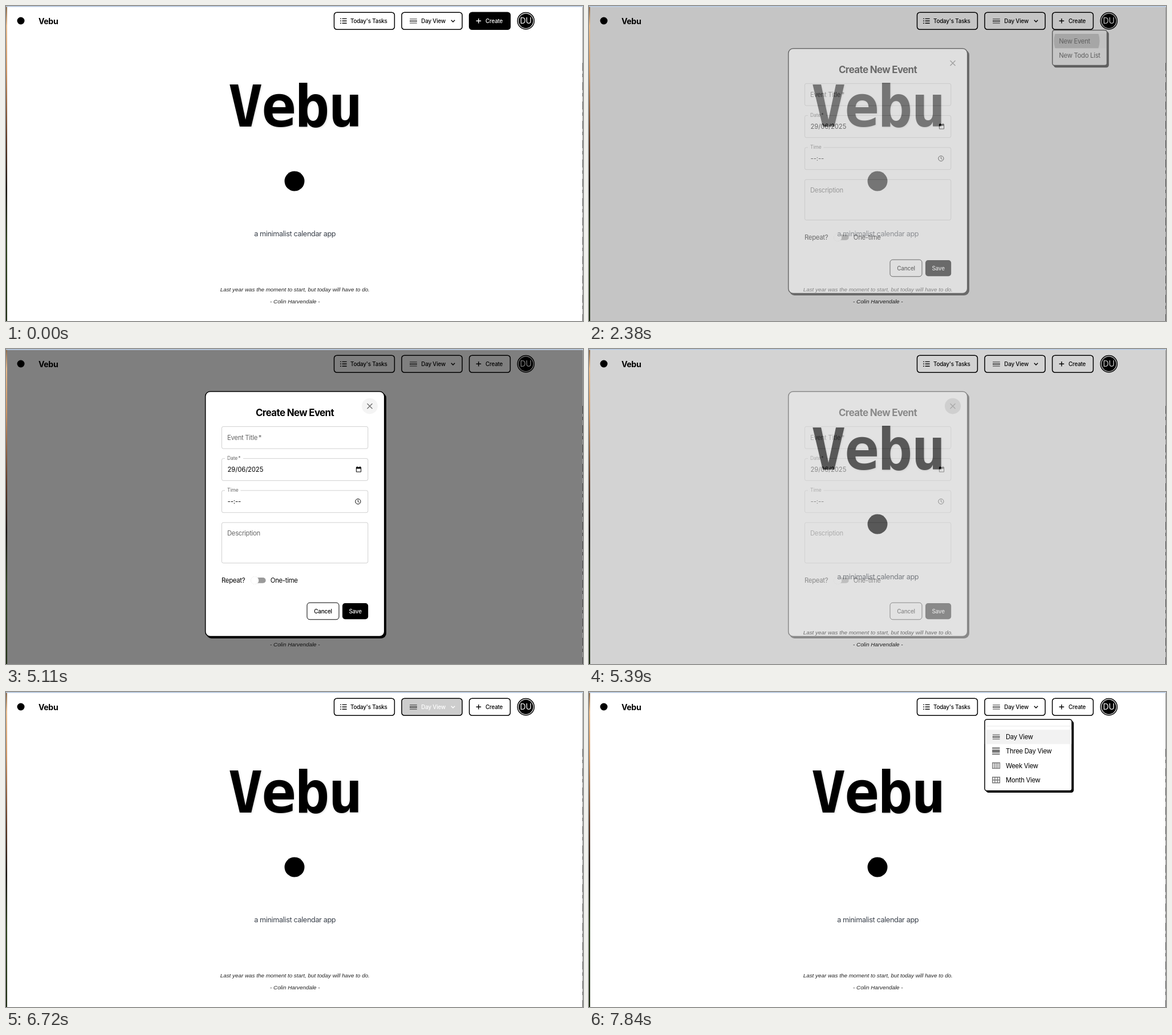
Animation, 1012 px wide and 554 px high, one loop 8 s. Source, as an HTML page:

```html
<!DOCTYPE html>
<html lang="en">
<head>
<meta charset="utf-8">
<title>Vebu</title>
<style>
  html, body { margin: 0; width: 100%; height: 100%; overflow: hidden; background: #fff; }
  #stage { display: block; width: 100%; height: 100%; }
  text { font: 11.3px Inter, sans-serif; letter-spacing: -.025em; white-space: pre; }
  .btn { font-size: 9.87px; font-weight: 500; letter-spacing: -.02em; }
  .brand { font-size: 14.1px; font-weight: 700; }
  .avatar { font-size: 14.1px; letter-spacing: 0; fill: #fff; }
  .hero { font: 700 101.5px "DejaVu Sans Mono", monospace; letter-spacing: -.025em;
          filter: drop-shadow(1.4px 1.4px 1.4px rgba(0,0,0,.16)); }
  .tagline { font-size: 12.7px; letter-spacing: -.03em; fill: #3b424c; }
  .quote { font: italic 9.85px "Liberation Sans", Arial, sans-serif; letter-spacing: 0; fill: #222; }
  .heading { font-size: 16.9px; font-weight: 700; letter-spacing: -.037em; }
  .label { fill: #666; }
  .small { font-size: 8.5px; letter-spacing: -.01em; }
  .value { letter-spacing: -.01em; }
  .mid { text-anchor: middle; }
  .box { fill: #fff; stroke: #000; stroke-width: 1.5; }
  .field { fill: none; stroke: rgba(0,0,0,.23); stroke-width: .8; }
  .line { fill: none; stroke: currentColor; stroke-width: 1.4; }
  .grey { fill: rgba(0,0,0,.54); }
  .greyLine { fill: none; stroke: rgba(0,0,0,.54); stroke-width: 2; }
  .hover { fill: rgba(0,0,0,.045); }
  .ink { color: #000; }
  .ink text, .ink .ripple { fill: currentColor; }
</style>
</head>
<body>
<svg id="stage" viewBox="0 0 1012 554" preserveAspectRatio="none">
  <defs>
    <linearGradient id="edge" x1="0" y1="0" x2="0" y2="1">
      <stop offset="0" stop-color="#8a6a4c"/><stop offset=".06" stop-color="#e9bb8c"/>
      <stop offset=".2" stop-color="#cf9563"/><stop offset=".42" stop-color="#5c3520"/>
      <stop offset=".58" stop-color="#120c08"/><stop offset=".75" stop-color="#2a3f18"/>
      <stop offset="1" stop-color="#1d2c12"/>
    </linearGradient>
    <g id="dayIcon">
      <path class="grey" fill-rule="evenodd" d="M3 6h18v2H3zM3 10h18v5H3zM5 12h14v1H5zM3 17h18v2H3z"/>
    </g>
  </defs>

  <rect width="1012" height="554" fill="#fff"/>

  <circle cx="26" cy="26" r="6.5"/>
  <text class="brand" x="57" y="31.6">Vebu</text>

  <g class="ink">
    <rect class="box" x="575.5" y="11.2" width="105.9" height="30.1" rx="4.9"/>
    <path class="line" d="M589.6 22.4h8M589.6 26.3h8M589.6 30.2h8M586.1 22.4h1.7M586.1 26.3h1.7M586.1 30.2h1.7"/>
    <text class="btn" x="604" y="30.1">Today's Tasks</text>
  </g>

  <g class="ink" id="viewBtn">
    <rect class="box" x="694" y="11.2" width="106.1" height="30.1" rx="4.9"/>
    <svg x="694.8" y="12" width="104.5" height="28.6"><circle class="ripple" cx="55" cy="14"/></svg>
    <use href="#dayIcon" transform="translate(706 17.7) scale(.705)"/>
    <text class="btn" x="728.3" y="30.1">Day View</text>
    <path class="line" d="M780.8 24.7l3.2 3.2 3.2-3.2"/>
  </g>

  <g class="ink" id="createBtn">
    <rect class="box" x="812.6" y="11.2" width="71.8" height="30.1" rx="4.9"/>
    <svg x="813.4" y="12" width="70.2" height="28.6"><circle class="ripple" cx="36" cy="14"/></svg>
    <path class="line" d="M824.6 26.3h8.6M828.9 22v8.6"/>
    <text class="btn" x="841" y="30.1">Create</text>
  </g>

  <circle class="box" cx="911.8" cy="26.2" r="14.6"/>
  <circle cx="911.8" cy="26.2" r="12.7"/>
  <text class="avatar mid" x="911.8" y="31.3">DU</text>

  <text class="hero" x="389.4" y="212">Vebu</text>
  <circle cx="506" cy="308" r="17.5"/>
  <text class="tagline mid" x="506.7" y="405">a minimalist calendar app</text>
  <text class="quote mid" x="506.8" y="502.4">Last year was the moment to start, but today will have to do.</text>
  <text class="quote mid" x="506.8" y="523">- Colin Harvendale -</text>

  <g id="createMenu">
    <rect x="814.8" y="44.8" width="97" height="63.4" rx="4.5"/>
    <rect class="box" x="812.7" y="42.4" width="95.8" height="62.2" rx="4"/>
    <rect class="hover" id="eventHover" x="813.5" y="49" width="94.2" height="25.3"/>
    <rect class="hover" id="todoHover" x="813.5" y="74.3" width="94.2" height="25.3"/>
    <svg x="813.5" y="49" width="94.2" height="25.3"><circle class="ripple" cx="42" cy="12.6"/></svg>
    <text x="824.3" y="65.8">New Event</text>
    <text x="824.3" y="91">New Todo List</text>
  </g>

  <g id="viewMenu">
    <rect x="696.2" y="50.6" width="154" height="126.4" rx="4.5"/>
    <rect class="box" x="694" y="48.2" width="153" height="125.6" rx="4"/>
    <rect x="694.8" y="59.6" width="151.4" height=".8" fill="#e0e0e0"/>
    <rect x="694.8" y="66.3" width="151.4" height="25.2" fill="#f2f2f2"/>
    <use href="#dayIcon" transform="translate(705.7 70.2) scale(.705)"/>
    <path class="grey" transform="translate(705.7 95.5) scale(.705)" d="M2 3h19v3H2zM2 8h19v8H2zM2 18h19v3H2z"/>
    <path class="greyLine" transform="translate(705.6 121) scale(.705)" d="M3 5h18v14H3zM7.5 5v14M12 5v14M16.5 5v14"/>
    <path class="greyLine" transform="translate(705.6 146.3) scale(.705)" d="M3 5h18v14H3zM9 5v14M15 5v14M3 12h18"/>
    <text x="731" y="83.1">Day View</text>
    <text x="731" y="108.4">Three Day View</text>
    <text x="731" y="133.7">Week View</text>
    <text x="731" y="159">Month View</text>
  </g>

  <rect id="backdrop" x="2" y="1.5" width="1009" height="553"/>

  <g id="modal">
    <rect x="351.5" y="77" width="315.5" height="432" rx="9"/>
    <rect class="box" x="349.7" y="74.7" width="314" height="430.8" rx="8.5"/>
    <circle class="hover" id="closeHover" cx="638" cy="100.4" r="14"/>
    <circle class="ripple" cx="638" cy="100.4"/>
    <path class="greyLine" style="stroke-width:1.4" d="M633.5 95.9l9 9M642.5 95.9l-9 9"/>
    <text class="heading mid" x="506.5" y="117.5">Create New Event</text>

    <rect class="field" x="378.4" y="136.4" width="256.4" height="38.8" rx="2.8"/>
    <rect class="field" x="378.4" y="192.6" width="256.4" height="38.8" rx="2.8"/>
    <rect class="field" x="378.4" y="248.9" width="256.4" height="38.8" rx="2.8"/>
    <rect class="field" x="378.4" y="305.2" width="256.4" height="71.2" rx="2.8"/>
    <path fill="#fff" d="M384 191.5h32v2.4h-32zM384 247.8h27.4v2.4H384z"/>

    <text class="label" x="388" y="159.8">Event Title</text>
    <text class="label" x="442.8" y="159.8">*</text>
    <text class="label small" x="388" y="195.2">Date</text>
    <text class="label small" x="407.2" y="195.2">*</text>
    <text class="label small" x="388" y="251.4">Time</text>
    <text class="value" x="388.6" y="216.2">29/06/2025</text>
    <text class="value" x="388.6" y="272.4">--:--</text>
    <text class="label" x="388" y="328.4">Description</text>

    <path class="line" style="stroke-width:1" d="M614.4 208.3h8.2v7.8h-8.2z"/>
    <path d="M614 207.8h9v2.6h-9zM615.4 206.6h1.2v2h-1.2zM620.4 206.6h1.2v2h-1.2z"/>
    <circle class="line" style="stroke-width:1" cx="617.4" cy="268.2" r="4.6"/>
    <path class="line" style="stroke-width:1" d="M617.4 265.2v3.2l2.2 1.4"/>

    <text x="378" y="411">Repeat?</text>
    <rect x="432" y="402" width="23.6" height="9.8" rx="4.9" fill="#9a9a9a"/>
    <circle cx="436.3" cy="406.9" r="7" fill="#fff" style="filter:drop-shadow(0 .6px .7px rgba(0,0,0,.25))"/>
    <text x="463.8" y="411">One-time</text>

    <rect class="box" style="stroke-width:1" x="528" y="446.2" width="56" height="29.6" rx="4.8"/>
    <text class="btn mid" x="556" y="464.7">Cancel</text>
    <rect x="590" y="447" width="45.2" height="28.2" rx="4.8"/>
    <text class="btn mid" x="612.6" y="464.7" fill="#fff">Save</text>
  </g>

  <rect width="1012" height="1.5" fill="#b0c4de"/>
  <rect y="1.5" width="2" height="553" fill="url(#edge)"/>
  <path d="M1011.5 2v552" stroke="#999"/>
  <path d="M1011.5 100v454" stroke="#444" stroke-dasharray="14 5 6 9"/>
</svg>
<script>
const LOOP = 8000, TICK = 70;
const $ = id => document.getElementById(id);
const set = (el, attrs) => { for (const k in attrs) el.setAttribute(k, attrs[k]); };
const mix = (a, b, k) => a + (b - a) * k;

// cubic-bezier(.4, 0, .2, 1)
function ease(x) {
  if (x <= 0) return 0;
  if (x >= 1) return 1;
  let lo = 0, hi = 1;
  for (let i = 0; i < 24; i++) {
    const s = (lo + hi) / 2, r = 1 - s;
    if (1.2 * r * r * s + .6 * r * s * s + s * s * s < x) lo = s; else hi = s;
  }
  return lo * lo * (3 - 2 * lo);
}
const ramp = (t, start, length) => ease((t - start) / length);

function ripple(host, radius, alpha) {
  set(host.querySelector('.ripple'), { r: radius, opacity: alpha });
}

function button(id, dark, hovered, radius, alpha) {
  const el = $(id), shade = Math.round(255 * (1 - dark));
  el.style.color = hovered ? '#fff' : '#000';
  el.querySelector('.box').style.fill = `rgb(${shade},${shade},${shade})`;
  ripple(el, radius, alpha);
}

function menu(id, x, y, alpha, grow) {
  const sx = mix(.75, 1, grow), sy = mix(.5625, 1, grow);
  set($(id), { opacity: alpha, transform: `translate(${x} ${y}) scale(${sx} ${sy}) translate(${-x} ${-y})` });
}

function draw(t) {
  button('createBtn', 1 - ramp(t, 340, 250), t < 340,
    46 * ramp(t, 235, 300), .3 * (1 - ramp(t, 300, 450)));
  menu('createMenu', 812, 42, ramp(t, 340, 218) * (1 - ramp(t, 2305, 218)), ramp(t, 340, 145));
  const onTodo = t >= 1190 && t < 1820;
  set($('eventHover'), { opacity: t >= 1120 && !onTodo ? 1 : 0 });
  set($('todoHover'), { opacity: onTodo ? 1 : 0 });
  ripple($('createMenu'), 50 * ramp(t, 2130, 480), mix(.1, .28, ramp(t, 2130, 300)));

  const open = ramp(t, 2305, 225) * (1 - ramp(t, 5308, 195));
  set($('backdrop'), { opacity: open / 2 });
  set($('modal'), { opacity: open });
  set($('closeHover'), { opacity: t >= 5110 ? 1 : 0 });
  ripple($('modal'), 14 * ramp(t, 5140, 260), .18);

  const hovered = t >= 6662 && t < 7345;
  button('viewBtn', ramp(t, 6662, 250) * (1 - ramp(t, 7345, 250)), hovered,
    60 * ramp(t, 7165, 300), .3 * (1 - ramp(t, 7300, 330)));
  menu('viewMenu', 694, 48, ramp(t, 7345, 252), ramp(t, 7345, 168));
}

const began = performance.now();
function frame() {
  const t = (performance.now() - began) % LOOP;
  draw(Math.floor(t / TICK) * TICK);
  requestAnimationFrame(frame);
}
frame();
</script>
</body>
</html>
```
